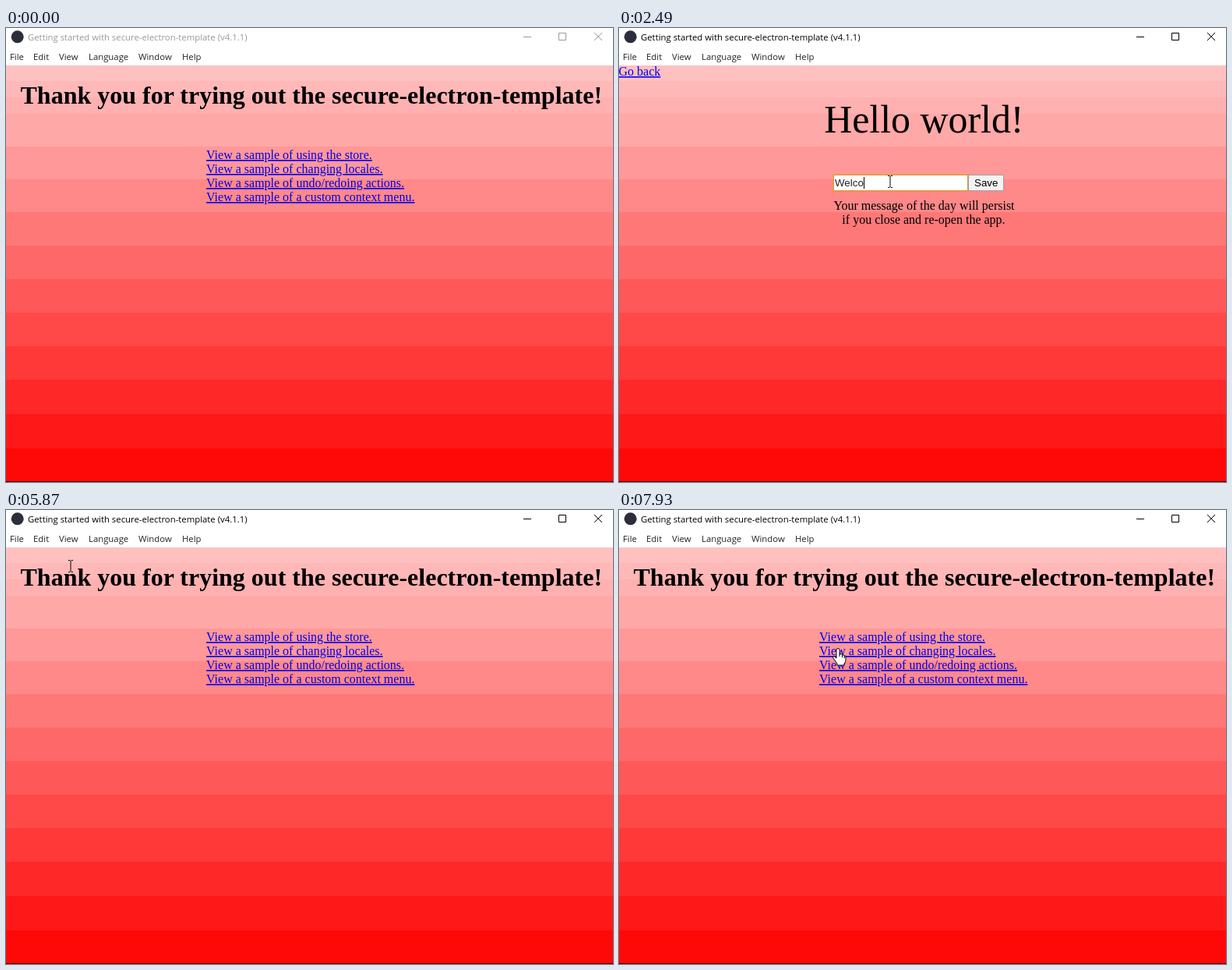
Animation, 779 px wide and 582 px high, one loop 8 s. Source, as an HTML page:

```html
<!DOCTYPE html>
<html lang="en">
<head>
<meta charset="utf-8">
<title>Getting started</title>
<style>
html, body { margin: 0; width: 100%; height: 100%; overflow: hidden; background: #fff; }
svg { display: block; }
text { white-space: pre; }
.ui { font: 11.35px "Open Sans", "Noto Sans", sans-serif; }
.serif { font: 16px "Liberation Serif", serif; }
.sans { font: 13.333px "Liberation Sans", sans-serif; }
.link { fill: #00e; text-decoration: underline; }
.h1 { font-size: 32px; font-weight: bold; }
.motd { font-size: 49.9px; }
.mid { text-anchor: middle; }
</style>
</head>
<body>
<svg width="779" height="582" viewBox="0 0 779 582">
  <g id="bands" shape-rendering="crispEdges"></g>
  <rect y="581" width="779" height="1" fill="#400000"/>

  <rect width="779" height="47" fill="#fff"/>
  <circle cx="14.7" cy="11.3" r="8" fill="#2b2e3b"/>
  <g class="ui">
    <text id="title" x="28" y="16">Getting started with secure-electron-template (v4.1.1)</text>
    <g fill="#222">
      <text x="5" y="41">File</text>
      <text x="35" y="41">Edit</text>
      <text x="68" y="41">View</text>
      <text x="106" y="41">Language</text>
      <text x="170" y="41">Window</text>
      <text x="226" y="41">Help</text>
    </g>
  </g>
  <path id="controls" d="M664 11.5h10M709.5 6.5h9v9h-9zM755 6l10 10m0-10l-10 10" fill="none"/>

  <g id="home" class="serif">
    <text class="h1" x="18.5" y="97">Thank you for trying out the secure-electron-template!</text>
    <text class="link" x="257" y="168">View a sample of using the store.</text>
    <text class="link" x="257" y="186">View a sample of changing locales.</text>
    <text class="link" x="257" y="204">View a sample of undo/redoing actions.</text>
    <text class="link" x="257" y="222">View a sample of a custom context menu.</text>
  </g>

  <g id="form" class="serif">
    <text class="link" x="-.5" y="61">Go back</text>
    <text id="motd" class="motd mid" x="391.3" y="134"></text>
    <rect id="ring" x="274.5" y="187.5" width="174" height="22" fill="none" stroke="#e59700" opacity=".35"/>
    <rect id="field" x="275.5" y="188.5" width="172" height="20" fill="#fff"/>
    <rect x="448.5" y="188.5" width="45" height="20" fill="#f3f3f3" stroke="#a0a0a0"/>
    <g class="sans">
      <text id="input" x="277" y="203"></text>
      <text x="456" y="203">Save</text>
    </g>
    <rect id="caret" y="191" width="1" height="15"/>
    <text class="mid" x="391.5" y="233">Your message of the day will persist</text>
    <text class="mid" x="391" y="251">if you close and re-open the app.</text>
  </g>

  <g id="cursor" fill="#fff" stroke="#000">
    <path id="arrow" d="M.5.5V16.5L4.2 13 6.8 18.6 9.2 17.5 6.7 12H11.5Z"/>
    <path id="hand" d="M-2 2Q-2 .5 0 .5T2 2V8Q5 6.5 5.5 9 8 8 8.2 10 10 9.5 10 11.5V15Q10 18 8 20V22H-1V20L-6 13Q-7.5 10.5-5 10.5L-2 13ZM2 8v3m3.5-2v3m2.7-2v3"/>
    <path id="beam" fill="none" d="M-3-7.5H-1L0-6.5 1-7.5H3M0-6.5V6.5M-3 7.5H-1L0 6.5 1 7.5H3"/>
  </g>
</svg>
<script>
const $ = id => document.getElementById(id);
const show = (id, on) => $(id).setAttribute('display', on ? 'inline' : 'none');
const clamp = p => Math.min(1, Math.max(0, p));
const smooth = p => p * p * (3 - 2 * p);

const LOOP = 8000, TICK = 80;
const ENTER = 70, ACTIVATE = 620, OPEN = 700, FOCUS = 1480, TYPE = 1940, SAVE = 4290;
const BACK = 5630, REOPEN = 6350, BACK_AGAIN = 7290;
const MESSAGE = 'Welcome to the app!';

// Background: 16-level colour steps, split into halves at the pale end
for (let k = -1.5; k <= 10; k += k < 0 ? .5 : 1) {
  const y = Math.round(110 + 41.8 * k + .11 * k * k), c = 168 - 16 * k;
  $('bands').innerHTML += `<rect y="${y}" width="779" height="${582 - y}" fill="rgb(255,${c},${c})"/>`;
}

// Progress from a to b, advancing once per screen capture
function progress(t, a, b) {
  const steps = Math.round((b - a) / TICK);
  return clamp(Math.floor((t - a) / (b - a) * steps + .05) / steps);
}

// Pointer moves: start, end, destination
const moves = [
  [ENTER, 470, 323, 158], [930, 1320, 348, 197],
  [4910, 5390, 55, 47], [5390, 5550, 30, 50], [5710, 6270, 296, 163],
  [6500, 6980, 15, 62], [7050, 7210, 25, 47], [BACK_AGAIN, 7930, 281, 177]
];

function pointer(t) {
  let x = 671, y = 570;
  for (const [a, b, toX, toY] of moves) {
    const p = smooth(progress(t, a, b));
    x += (toX - x) * p;
    y += (toY - y) * p;
  }
  return [x, y];
}

function pointerKind(page, x, y) {
  const within = (l, t, r, b) => x >= l && x <= r && y >= t && y <= b;
  if (page === 'home') {
    if (within(257, 154, 524, 226)) return 'hand';
    return within(19, 70, 764, 104) ? 'beam' : 'arrow';
  }
  if (within(0, 47, 53, 65)) return 'hand';
  return within(275, 188, 448, 209) || within(185, 92, 596, 145) ? 'beam' : 'arrow';
}

// Typing speeds up after the first letters and slows at the last two
function typed(t) {
  if (t < TYPE || t >= SAVE) return 0;
  const n = 1 + 3 * clamp((t - TYPE) / 470) + 13 * clamp((t - 2410) / 1100) + 2 * clamp((t - 3510) / 390);
  return Math.floor(n + .05);
}

function draw(t) {
  const page = t < OPEN || t >= BACK && t < REOPEN || t >= BACK_AGAIN ? 'home' : 'form';
  show('home', page === 'home');
  show('form', page === 'form');

  const tone = t >= ACTIVATE ? '#000' : '#999';
  $('title').setAttribute('fill', tone);
  $('controls').setAttribute('stroke', tone);

  const saved = t >= SAVE, focused = t >= FOCUS && t < BACK;
  const text = MESSAGE.slice(0, typed(t)), input = $('input');
  $('motd').textContent = saved ? MESSAGE : 'Hello world!';
  show('ring', focused);
  $('field').setAttribute('stroke', focused ? '#d99a3c' : '#a0a0a0');
  input.textContent = text || 'New message of the day';
  input.setAttribute('fill', text ? '#222' : '#757575');

  // Each key press restarts the blink, so the caret only blinks once idle
  show('caret', focused && (!saved || Math.floor((t - SAVE) / 470) % 2 === 0));
  if (page === 'form') {
    $('caret').setAttribute('x', Math.round(277 + (text ? input.getComputedTextLength() : 0)));
  }

  const [x, y] = pointer(t), kind = pointerKind(page, x, y);
  show('cursor', t >= ENTER);
  for (const k of ['arrow', 'hand', 'beam']) show(k, k === kind);
  $('cursor').setAttribute('transform', `translate(${Math.round(x)} ${Math.round(y)})`);
}

const start = performance.now();
function frame() {
  draw((performance.now() - start) % LOOP);
  requestAnimationFrame(frame);
}
frame();
</script>
</body>
</html>
```
